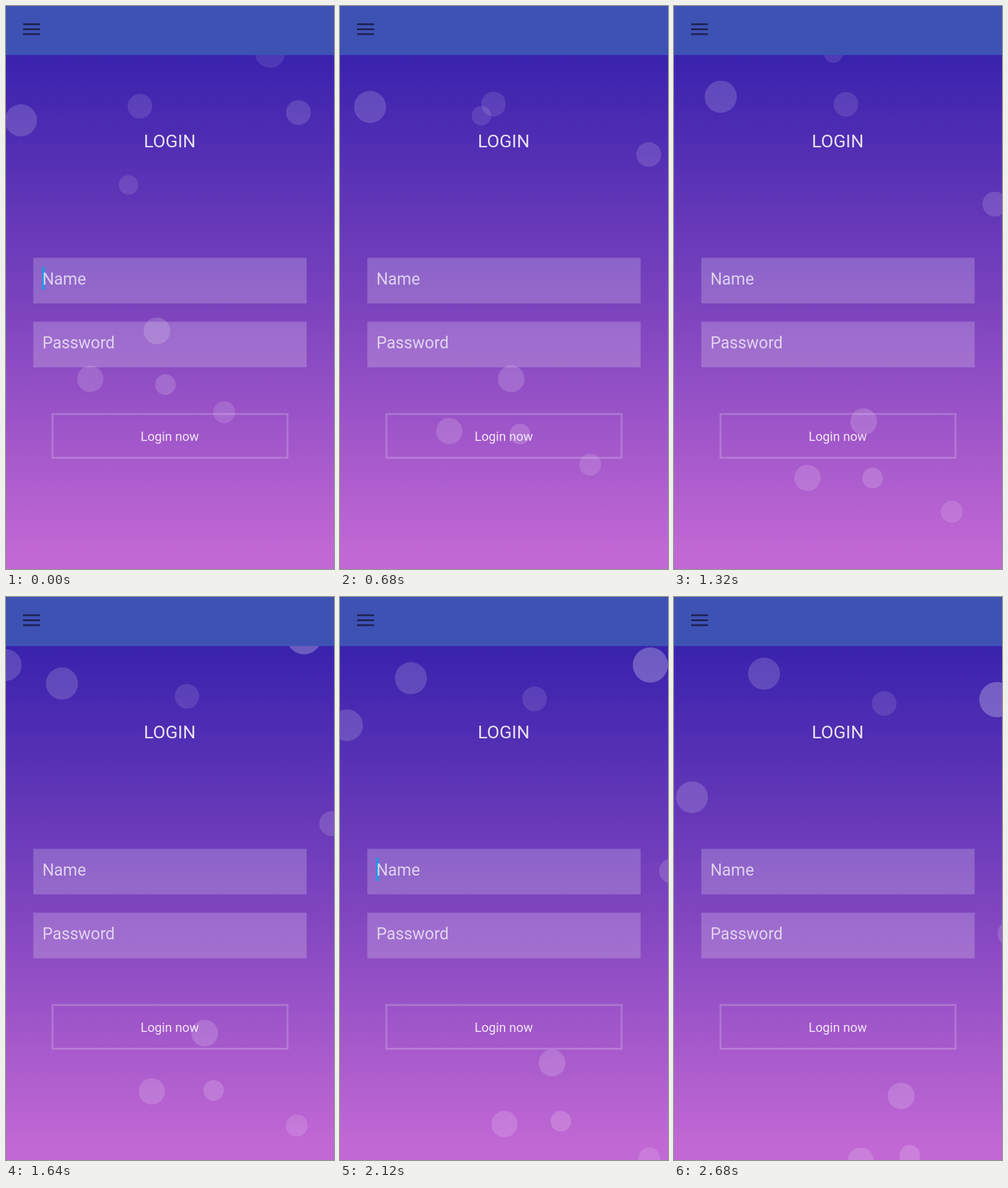
Write an HTML page that moves like this. It is 572x980 px and loops after 2.72 s.

```html
<!DOCTYPE html>
<html lang="en">
<head>
<meta charset="utf-8">
<title>Login</title>
<style>
  html, body { margin: 0; width: 100%; height: 100%; overflow: hidden; background: #3a23ae; }
  svg { display: block; width: 572px; height: 980px; }
  text { font-family: Roboto, sans-serif; fill: #fff; }
</style>
</head>
<body>
<svg viewBox="0 0 572 980" xmlns="http://www.w3.org/2000/svg">
  <defs>
    <linearGradient id="sky" gradientUnits="userSpaceOnUse" x1="0" y1="85" x2="0" y2="980">
      <stop offset="0" stop-color="#3922ad"/>
      <stop offset="0.5" stop-color="#7d44be"/>
      <stop offset="0.97" stop-color="#c168d4"/>
    </linearGradient>
  </defs>
  <rect width="572" height="980" fill="url(#sky)"/>
  <g id="bubbles" fill="#fff"></g>

  <g fill="#fff" fill-opacity="0.2">
    <rect x="47.6" y="438.3" width="476.7" height="79.4"/>
    <rect x="47.6" y="549.5" width="476.7" height="79.4"/>
  </g>
  <rect x="81" y="710.2" width="410" height="76.2" fill="none" stroke="#fff" stroke-opacity="0.2" stroke-width="3.2"/>
  <rect id="caret" x="63.2" y="454.3" width="4.4" height="40" fill="#1a9be4"/>

  <text x="285.5" y="246.4" font-size="31.7" text-anchor="middle" fill-opacity="0.85">LOGIN</text>
  <g font-size="28.6" fill-opacity="0.7">
    <text x="63.4" y="485">Name</text>
    <text x="63.4" y="596">Password</text>
  </g>
  <text x="285.6" y="756.8" font-size="22.2" text-anchor="middle" fill-opacity="0.85">Login now</text>

  <rect width="572" height="85.4" fill="#3e52b4"/>
  <path d="M29.8 31.7H59.4M29.8 40.4H59.4M29.8 49H59.4" stroke="#1b2250" stroke-width="3"/>
</svg>
<script>
  const LOOP = 2720, STEP = 40;
  const MID_X = 286, MID_Y = 490;
  const PULL = 0.048, SAG = 9;

  const layer = document.getElementById('bubbles');
  const caret = document.getElementById('caret');
  const bubbles = [];

  // A bubble drifts from one point to another; its path bows away from the
  // middle of the stage, as if it were being pulled towards it.
  function bubble(r, alpha, from, to, sag = SAG) {
    const el = document.createElementNS('http://www.w3.org/2000/svg', 'circle');
    el.setAttribute('r', r);
    el.setAttribute('fill-opacity', alpha);
    layer.appendChild(el);
    const bow = [
      PULL * (MID_X - (from[0] + to[0]) / 2),
      sag * Math.sign(MID_Y - from[1])
    ];
    bubbles.push({ el, from, to, bow });
  }

  bubble(28, .16, [26, 199], [159.5, 133]);
  bubble(21.5, .115, [233.5, 174.5], [368.5, 186]);
  bubble(21.6, .14, [510, 185.5], [586, 594], 39);
  bubble(17, .11, [213.5, 311.5], [347, -143]);
  bubble(23.3, .16, [263.3, 565.5], [398, 872.5]);
  bubble(22.9, .15, [147, 649], [328.5, 985.5]);
  bubble(18, .16, [278, 659], [413, 976]);
  bubble(19.1, .13, [380.5, 707], [576, 1046]);
  bubble(26.5, .1, [460.5, 81], [541, 6]);
  bubble(30.7, .26, [427.7, -82], [564.5, 183]);
  bubble(27.7, .16, [-19, -223], [33, 357.5]);

  function draw(ms) {
    const t = Math.floor((ms % LOOP) / STEP) * STEP;
    const p = t / LOOP;
    const arc = 4 * p * (1 - p);
    for (const { el, from, to, bow } of bubbles) {
      const [x, y] = from.map((a, i) => a + (to[i] - a) * p - bow[i] * arc);
      el.setAttribute('cx', x);
      el.setAttribute('cy', y);
    }
    caret.setAttribute('visibility', (t + 200) % 1000 < 500 ? 'visible' : 'hidden');
  }

  let start;
  function tick(now) {
    start ??= now;
    draw(Math.max(0, now - start));
    requestAnimationFrame(tick);
  }
  draw(0);
  requestAnimationFrame(tick);
</script>
</body>
</html>
```
